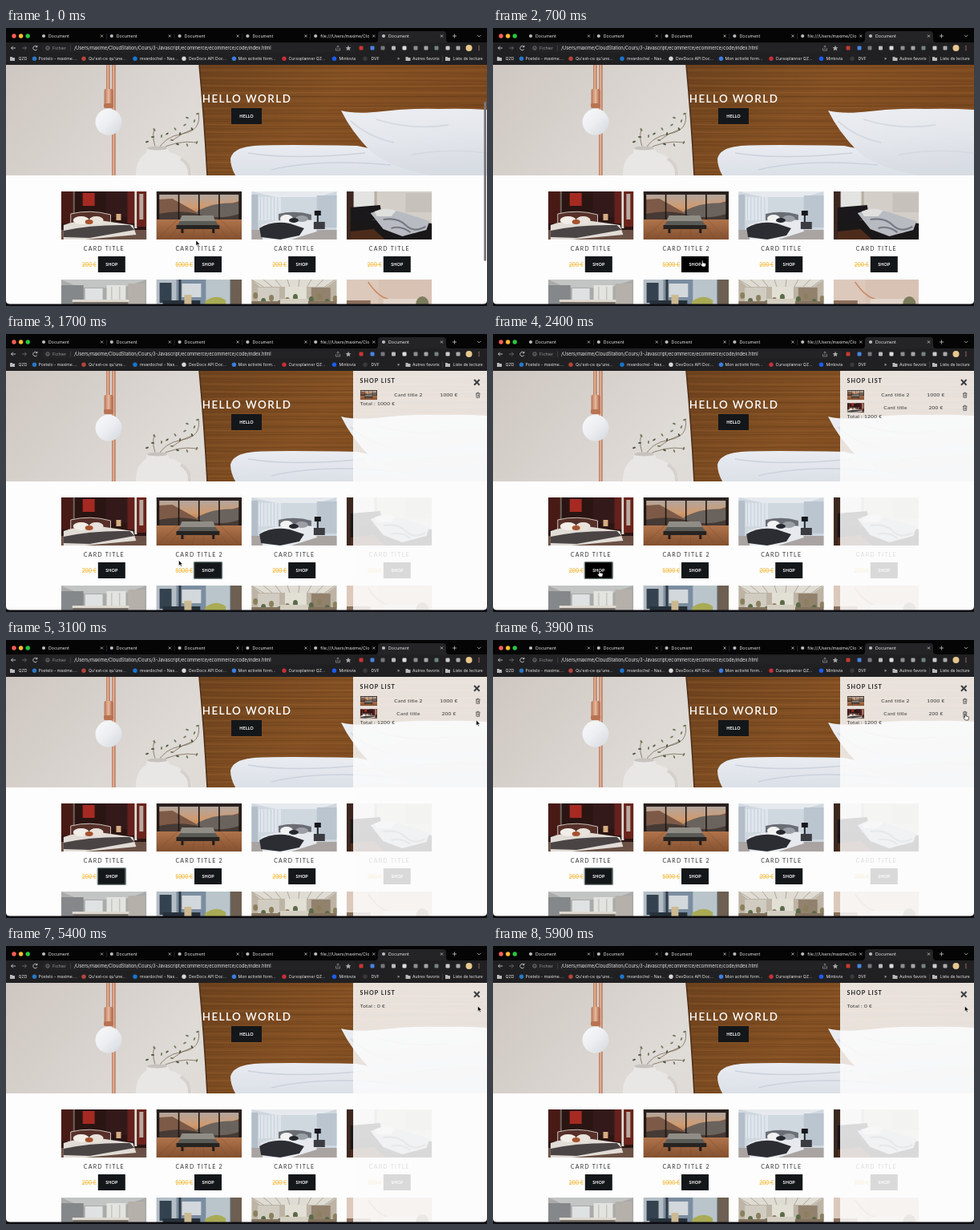
An HTML page for the animation above (6000 ms loop, 600 by 347 pixels).

```html
<!DOCTYPE html>
<html lang="fr">
<head>
<meta charset="utf-8">
<title>Shop</title>
<style>
html, body { margin: 0; width: 100%; height: 100%; overflow: hidden; background: #000; }
svg { display: block; }
#stage { width: 600px; height: 347px; }
text { white-space: pre; }
.ui { font: 5.3px Inter, sans-serif; fill: #e6e6e6; }
.url { font-size: 5.72px; }
.mark { font-size: 5.15px; }
.page { font-family: Lato, sans-serif; }
.mid { text-anchor: middle; }
.hero { font-size: 13.4px; font-weight: 600; letter-spacing: 1.45px; fill: #fff; }
.btn { font-size: 5.4px; font-weight: 700; letter-spacing: .1px; fill: #fff; }
.title { font-size: 7px; letter-spacing: 1.25px; fill: #333; }
.price { font-size: 7px; font-weight: 700; fill: #f3c253; text-decoration: line-through; }
.head { font-size: 7.2px; font-weight: 700; letter-spacing: 1px; fill: #222; }
.item { font-size: 6.5px; letter-spacing: .3px; fill: #333; }
</style>
</head>
<body>
<svg id="stage" viewBox="0 0 600 347"></svg>
<script>
const rect = (x, y, w, h, fill, rx = 0, more = '') =>
  `<rect x="${x}" y="${y}" width="${w}" height="${h}" fill="${fill}" rx="${rx}" ${more}/>`;
const dot = (x, y, r, fill) => `<circle cx="${x}" cy="${y}" r="${r}" fill="${fill}"/>`;
const oval = (x, y, rx, ry, fill) => `<ellipse cx="${x}" cy="${y}" rx="${rx}" ry="${ry}" fill="${fill}"/>`;
const path = (d, fill) => `<path d="${d}" fill="${fill}"/>`;
const line = (d, color, w = 1, more = '') =>
  `<path d="${d}" fill="none" stroke="${color}" stroke-width="${w}" ${more}/>`;
const text = (x, y, cls, s, more = '') => `<text x="${x}" y="${y}" class="${cls}" ${more}>${s}</text>`;
const group = (id, body) => `<g id="${id}">${body}</g>`;
const many = (n, f) => Array.from({ length: n }, (_, i) => f(i)).join('');
const gradient = (id, stops, dir = 'x2="0" y2="1"') =>
  `<linearGradient id="${id}" ${dir}>` +
  stops.map((c, i) => `<stop offset="${i / (stops.length - 1)}" stop-color="${c}"/>`).join('') +
  '</linearGradient>';

let seed = 7;
const rand = () => (seed = seed * 16807 % 2147483647) / 2147483647;

// Room pictures, each 107 by 60
const rooms = [
  rect(0, 0, 107, 60, '#2a1513') + rect(0, 0, 15, 40, '#471a16') + rect(27, 2, 15, 16, '#a62a22') +
    rect(15, 0, 2, 34, '#70635a') + rect(56, 0, 27, 32, '#33191a') + rect(83, 0, 9, 40, '#64201d') +
    rect(92, 0, 3, 46, '#e4ded6') + rect(95, 0, 12, 44, '#6b241c') + rect(98, 3, 5, 32, '#b9aaa0') +
    rect(0, 48, 107, 12, '#6b5145') + path('M12 28Q36 23 62 29V42H12Z', '#57302a') +
    line('M12 40V28Q36 22 62 29V38', '#cfc4ba', 1) +
    path('M3 42Q24 34 55 37L90 42 94 54 30 60H3Z', '#e2dcd6') + oval(25, 36, 10, 5, '#f2ede7') +
    oval(44, 36, 9, 5, '#e8e2da') + oval(35, 38, 5, 3, '#a5522e') +
    path('M3 49Q38 41 86 42L92 48 36 58 3 57Z', '#4a4445') + rect(69, 28, 6, 8, '#d5ac82'),
  rect(0, 0, 107, 60, '#2a1f1b') + rect(3, 4, 101, 31, 'url(#dusk)') +
    path('M3 10L20 9 38 19 52 27 70 22 104 12V35H3Z', '#7d5a47') +
    path('M52 24Q75 12 104 15V36H45Z', '#6a625d') + path('M3 28Q30 22 55 29T104 28V36H3Z', '#463a34') +
    many(5, i => rect(2 + i * 25.3, 0, 1.6, 36, '#1d1715')) + rect(0, 0, 107, 4, '#29211f') +
    rect(0, 35, 107, 25, 'url(#floor)') +
    many(8, i => line(`M${i * 15} 60L${27 + i * 7.6} 35`, '#7d4b2d', .5)) +
    path('M31 35L72 35 79 44 25 44Z', '#5a5a56') + path('M32 30H71L74 37H29Z', '#8f8d86') +
    path('M25 42H79V47H25Z', '#272321') + rect(31, 47, 3, 5, '#211b19') + rect(70, 47, 3, 5, '#211b19'),
  rect(0, 0, 107, 60, '#cfd7df') + path('M0 0H107L82 7H31Z', '#e6eaee') + rect(0, 4, 8, 46, '#b3bec9') +
    rect(9, 7, 28, 29, '#dfe5eb') + many(6, i => rect(11 + i * 4.3, 7, .7, 29, '#bdc8d2')) +
    rect(82, 5, 25, 40, '#bac5d0') + rect(0, 48, 107, 12, '#a9a4a1') +
    path('M34 28Q55 23 75 29V39H34Z', '#6a6d74') + path('M12 42Q38 32 78 36L82 50 50 60H14Z', '#e6e9ed') +
    path('M10 46Q26 36 48 40L66 46 60 55 36 60 12 57Z', '#2c2d33') + oval(44, 34, 8, 5, '#f2f2f2') +
    oval(63, 34, 8, 4, '#9ba0a7') + oval(53, 36, 6, 3, '#25282f') + rect(79, 24, 8, 6, '#16171b') +
    rect(82, 30, 2, 9, '#24252a') + rect(78, 38, 14, 9, '#3a3c42'),
  rect(0, 0, 107, 60, '#d3cfc8') + rect(0, 0, 9, 60, '#3d2820') + rect(9, 0, 26, 22, '#e3e4e2') +
    rect(35, 0, 3, 24, '#b9aea2') + rect(74, 2, 33, 24, '#c6c2bb') +
    path('M5 20L42 17 45 33 5 42Z', '#1a181a') + path('M5 38L60 33 107 40V60H5Z', '#191718') +
    path('M5 50L34 47 48 60H5Z', '#4d2b1b') +
    path('M30 27Q50 20 70 26L104 37 100 48 70 56 46 47Z', '#b8bbc1') +
    path('M35 25Q48 19 62 24L56 31 38 31Z', '#e0e0df') +
    line('M46 35Q64 32 74 42T99 44M56 46Q68 42 80 51', '#747982', 2.2),
  rect(0, 0, 107, 60, '#a9aaa9') + path('M0 0H107L78 10H23Z', '#c3c5c5') + rect(0, 7, 28, 34, '#85888a') +
    rect(30, 11, 22, 17, '#dfe2e2') + rect(57, 7, 24, 21, '#e3e3df') + rect(84, 5, 21, 50, '#b5b0a9') +
    rect(63, 9, .8, 19, '#aaa') + rect(73, 9, .8, 19, '#aaa') + rect(15, 25, 69, 35, '#777069') + rect(14, 25, 71, 3, '#dfd9d0'),
  rect(0, 0, 107, 60, '#7b8da0') + rect(0, 0, 25, 60, '#b4bdc5') + rect(4, 4, 15, 25, '#33424e') +
    rect(28, 0, 3, 60, '#363b42') + rect(32, 5, 24, 17, '#d2d8db') + rect(62, 0, 30, 60, '#b9c5ca') +
    rect(93, 0, 14, 60, '#6d5f51') + path('M61 27Q75 17 87 26V60H59Z', '#a9ab55') +
    path('M8 26H55V60H8Z', '#28323c') + rect(35, 19, 9, 12, '#cdb991'),
  rect(0, 0, 107, 60, '#bdb4a5') + path('M0 0H107L94 9H11Z', '#dfdcd4') +
    many(8, i => line(`M${i * 15} 0L${15 + i * 11} 9`, '#a49a8b', .8)) + rect(8, 10, 27, 20, '#d0ccc1') +
    rect(42, 9, 27, 19, '#e2dfd5') + rect(75, 10, 24, 20, '#92826d') +
    many(11, i => oval(5 + i * 10, 20 + i * 7 % 11, 3, 4, i % 2 ? '#5a6b47' : '#8b805d')) + rect(0, 27, 107, 33, '#83735f') +
    rect(36, 24, 35, 9, '#d5cfc2'),
  rect(0, 0, 107, 60, '#d8c2b4') + rect(0, 0, 40, 60, '#dcc9bc') + line('M27 3Q40 22 52 24', '#c98a63', 1.5) +
    rect(0, 26, 30, 34, '#8a705c') + rect(46, 24, 44, 36, '#e2d5ca') + oval(95, 30, 8, 9, '#7d7c5e')
];
const board = 'M241 46H600V184H251Q247 110 241 46Z';
const defs = '<defs>' +
  gradient('dusk', ['#b3a59d', '#cf9b70', '#b06a40']) +
  gradient('floor', ['#b0744b', '#83502f']) +
  gradient('wall', ['#cec7c1', '#e0dcd8', '#d9d3ce'], 'x2="1" y2=".2"') +
  gradient('wood', ['#6e431f', '#855124', '#7c4920'], 'x2="1" y2=".35"') +
  gradient('copper', ['#b57355', '#e9b99e', '#a45f43'], 'x2="1"') +
  gradient('bulb', ['#f9fafb', '#eceef1', '#d3d7dc'], 'x2="1" y2="1"') +
  gradient('pillow', ['#eceef2', '#e4e7ec', '#d8dce3'], 'x2=".2" y2="1"') +
  gradient('sheet', ['#e9ecf1', '#d9dee6']) +
  rooms.map((r, i) => `<symbol id="room${i}" viewBox="0 0 107 60" preserveAspectRatio="none">${r}</symbol>`).join('') +
  '<clipPath id="hero"><rect y="46" width="600" height="138"/></clipPath>' +
  `<clipPath id="board"><path d="${board}"/></clipPath></defs>`;
const room = (i, x, y, w = 106.5, h = 60) => `<use href="#room${i}" x="${x}" y="${y}" width="${w}" height="${h}"/>`;

function grain(i) {
  const y = 43 + i * 3.2, a = rand() * 8 - 4, b = rand() * 8 - 4;
  return line(`M241 ${y}C330 ${y + a} 420 ${y + b} 600 ${y + a / 2}`, i % 3 ? '#54300f' : '#a96f35', .6 + rand(), 'opacity=".25"');
}

function hero() {
  const sprigs = [[183, 136], [185, 127], [194, 135], [201, 132], [207, 140], [211, 126], [217, 132], [223, 121],
    [226, 112], [232, 126], [235, 116], [239, 107], [214, 145], [226, 146], [238, 143], [176, 142]];
  const leaves = sprigs.map(([x, y], i) =>
    `<ellipse cx="${x}" cy="${y}" rx="2.1" ry="1" fill="${i % 3 ? '#737a5c' : '#4d583f'}" transform="rotate(${i * 47} ${x} ${y})"/>`).join('');
  return '<g clip-path="url(#hero)">' + rect(0, 46, 600, 138, 'url(#wall)') + path(board, 'url(#wood)') +
    '<g clip-path="url(#board)">' + many(45, grain) + '</g>' +
    line('M241 46Q247 110 251 184', '#4f2e17', 1.5) +
    path('M280 163Q283 150 306 147.5T438 147L500 160 600 169V190H290Q280 176 280 163Z', 'url(#sheet)') +
    line('M302 156Q356 165 448 156M331 177Q391 163 480 171', '#ccd2dc', 1.5) +
    path('M418 103Q436 108 470 104T540 101Q570 100 600 102V184H530Q476 174 454 153 430 128 418 103Z', 'url(#pillow)') +
    line('M430 116Q452 136 484 143M462 114Q506 128 552 121M506 158Q555 150 600 156', '#d5d9e0', 1.8) +
    rect(125, 46, 4.5, 31, 'url(#copper)') + rect(132, 46, 4.5, 138, 'url(#copper)') +
    rect(122.5, 76, 11, 24, 'url(#copper)', 2) + rect(122, 94, 12, 6, '#b97353', 2) +
    dot(128, 117.3, 16.5, 'url(#bulb)') +
    line('M189 154Q181 140 185 125M189 154Q196 136 220 132T240 106M189 153Q213 139 239 143M208 140Q219 131 234 126', '#695b42', .7) +
    leaves + path('M176 149Q188 146 201 149L204 155Q232 163 232 186H162Q161 164 175 156Z', '#e9e7e5') +
    oval(188.5, 150, 12.5, 2.5, '#c7c2bd') + line('M218 163Q230 170 229 184', '#d6d1cd', 4) + '</g>';
}

function chrome() {
  const tabs = ['Document', 'Document', 'Document', 'Document', 'file:///Users/maxime/Clo', 'Document'];
  const marks = [
    [8, '', 15.5, 'QZD'], [35.5, '#2878c8', 40.5, 'Postelo - maxime....'], [97, '#b8433b', 103, 'Qu\'est-ce qu\'une...'],
    [161, '#1776d2', 167, 'mvardochel - Nas...'], [222, '#d7d7d7', 228, 'DevDocs API Doc...'],
    [284.5, '#3b7de0', 289.5, 'Mon activité form...'], [347, '#c72f38', 352.5, 'Cursoplanner QZ...'],
    [409.5, '#1d5df2', 415.5, 'Mintovia'], [448, '#3a3a3c', 455.5, 'DVF'], [501.5, '', 507, 'Autres favoris'], [551, '', 557.5, 'Liste de lecture']];
  const tools = [[443, '#c8372f'], [457, '#4a83e0'], [470, '#77787c'], [483.5, '#bbb'], [497, '#ddd'], [511, '#8d8d8d'],
    [524, '#a5a5a8'], [537, '#71847c'], [551, '#ccc'], [564, '#aaa']];
  const folder = x => path(`M${x - 3} 36H${x - .5}l1 1H${x + 3}V41H${x - 3}Z`, '#b9b9b9');
  return rect(0, 0, 600, 46, '#050505') + rect(0, 18, 600, 28, '#202022') +
    path('M460 18Q464 18 464 14V8Q464 4 468 4H545Q549 4 549 8V14Q549 18 553 18Z', '#242426') +
    ['#ff5f57', '#febc2e', '#28c840'].map((c, i) => dot(10 + i * 8.6, 10, 2.7, c)).join('') +
    tabs.map((s, i) => {
      const x = 47 + i * 84.8;
      return dot(x, 10, 2.1, '#b9bdc2') + text(x + 6, 12, 'ui', s) +
        line(`M${x + 71} 8.5l3 3m0-3l-3 3`, '#ddd', .7) + (i < 4 ? rect(x + 78, 7, .5, 7, '#444') : '');
    }).join('') + line('M557 10h5m-2.5-2.5v5', '#ddd', .7) + line('M588 8.8l2.2 2.2 2.2-2.2', '#ddd', .7) +
    rect(44, 19.5, 392, 11, '#232325', 5.5) +
    line('M12 25H6.5m2.3-2.3L6.5 25l2.3 2.3', '#ddd', .8) + line('M20 25h5.5m-2.3-2.3l2.3 2.3-2.3 2.3', '#777', .8) +
    line('M38.5 23.3a2.7 2.7 0 1 0 .3 3.2M38.9 21.8v2h-2', '#ddd', .8) +
    '<circle cx="52" cy="25" r="2.2" fill="none" stroke="#aaa" stroke-width=".6"/>' + rect(51.7, 24.5, .6, 1.8, '#aaa') +
    text(58, 27, 'ui', 'Fichier', 'style="fill:#999"') + rect(80.5, 21.5, .5, 7, '#555') +
    text(85, 27, 'ui url', '/Users/maxime/CloudStation/Cours/3-Javascript/ecommerce/ecommerce/code/index.html') +
    line('M411.5 25v3h5v-3M414 27v-5m-1.5 1.5l1.5-1.5 1.5 1.5', '#aaa', .6) +
    path('M427 21.8l1 2.2 2.4.2-1.8 1.6.6 2.4-2.2-1.3-2.2 1.3.6-2.4-1.8-1.6 2.4-.2Z', '#aaa') +
    tools.map(([x, c]) => rect(x - 2.5, 22.5, 5, 5, c, 1)).join('') +
    dot(577.5, 25, 4, '#e7c78d') + many(3, i => dot(590, 22.8 + i * 2.2, .7, '#d98a80')) +
    marks.map(([x, c, tx, s]) => (c ? dot(x, 38.3, 2.7, c) : folder(x)) + text(tx, 40.2, 'ui mark', s)).join('') +
    text(488, 40.2, 'ui', '»') + rect(544.5, 34.5, .5, 8, '#555');
}

function shop() {
  const xs = [68.8, 187.6, 306.2, 424.8];
  const cards = xs.map((x, i) => {
    const mid = x + 53, odd = i === 1, bx = odd ? 235 : x + 46;
    return room(i, x, 204) + text(mid + .5, 278.2, 'title mid', odd ? 'CARD TITLE 2' : 'CARD TITLE') +
      text(odd ? 211 : x + 26, 297.6, 'price', odd ? '1000 €' : '200 €') +
      rect(bx, 285, 34, 20, '#14171a', 0, `id="buy${i}"`) + text(bx + 17, 297.2, 'btn mid', 'SHOP') + room(i + 4, x, 314);
  }).join('');
  const ring = (id, x) => rect(x, 284.6, 35, 20.8, 'none', 1, `id="${id}" stroke="#71807a" stroke-width="1.4"`);
  return `<g class="page">${hero()}` + text(300.5, 93.2, 'hero mid', 'HELLO WORLD') +
    rect(281, 100, 38, 20, '#14171a') + text(300, 112.2, 'btn mid', 'HELLO') + cards +
    ring('ring0', 114.3) + ring('ring1', 234.5) + '</g>' + rect(596.2, 92, 2.8, 199, '#77777a', 1.4, 'id="bar"');
}

function panel() {
  const bin = y => line(`M586 ${y - 2}h5.4M587.8 ${y - 2}v-1h1.8v1M586.6 ${y - 2}l.3 5.2h3.6l.3-5.2M588 ${y - .6}v2.6m1.4-2.6v2.6`, '#444', .7);
  const row = (id, y, pic, name, cost) => group(id, room(pic, 441.8, y - 6, 21.2, 12) +
    text(502, y + 2.2, 'item mid', name) + text(552.5, y + 2.2, 'item mid', cost) + bin(y));
  return `<g id="panel" class="page">` + rect(433, 46, 167, 299, '#fcfcfc', 0, 'fill-opacity=".85"') +
    text(441.5, 61, 'head', 'SHOP LIST') + line('M584 57l6.6 6.8m0-6.8l-6.6 6.8', '#3d3f42', 2) +
    row('row0', 76.2, 1, 'Card title 2', '1000 €') + row('row1', 92.2, 0, 'Card title', '200 €') +
    text(441.8, 88.7, 'item', '', 'id="total"') + '</g>';
}

const floor = path('M0 340Q0 344.6 5 344.6H595Q600 344.6 600 340V347H0Z', '#0d0d12');
const cursors =
  group('arrow', '<path d="M0 0V6.8L1.6 5.3 2.7 7.8 3.8 7.3 2.7 4.9H4.9Z" fill="#000" stroke="#fff" stroke-width=".5"/>') +
  group('hand', '<path d="M0 .4Q.8-.5 1.4.4V3L4.6 3.7Q5.3 4 5.1 5L4.4 8H.6L-1.7 5Q-1.7 4-.8 4.2L0 4.9Z" fill="#fff" stroke="#000" stroke-width=".6"/>');

const stage = document.getElementById('stage');
stage.innerHTML = defs + rect(0, 46, 600, 301, '#fdfdfd') + shop() + panel() + chrome() + floor + cursors;

// time, x, y of the pointer
const moves = [
  [0, 237, 265], [200, 237, 265], [600, 260.5, 290], [1200, 260.5, 290], [1700, 215.5, 282.5],
  [2000, 132, 295], [2400, 132, 295], [2900, 578, 108], [3100, 586.5, 100], [3500, 588.5, 92],
  [4300, 588.5, 92], [4700, 588, 73], [4800, 588, 73], [5000, 588.5, 75], [6000, 588.5, 75]];
const hands = [[500, 1300], [2000, 2500], [3400, 4200], [4900, 5400]];
// time, rows in the list, total
const lists = [[0, 1, 1000], [2200, 2, 1200], [4200, 1, 1000], [5400, 0, 0]];
const LOOP = 6000, STEP = 100, OPEN = 900, SLIDE = 400;

const get = id => document.getElementById(id);
const show = (id, on) => get(id).setAttribute('visibility', on ? 'inherit' : 'hidden');
const clamp = k => Math.min(1, Math.max(0, k));
const ease = k => k * k * (3 - 2 * k);
const within = (t, a, b) => t >= a && t < b;

function pointer(t) {
  const i = moves.findIndex((m, n) => n && t < m[0]);
  const [t0, x0, y0] = moves[i - 1], [t1, x1, y1] = moves[i];
  const k = ease((t - t0) / (t1 - t0));
  return [x0 + (x1 - x0) * k, y0 + (y1 - y0) * k];
}

function draw(now) {
  const t = Math.floor(now % LOOP / STEP) * STEP;
  const over = hands.some(([a, b]) => within(t, a, b));
  const at = `translate(${pointer(t).join(' ')})`;
  for (const id of ['arrow', 'hand']) get(id).setAttribute('transform', at);
  show('arrow', !over);
  show('hand', over);
  get('bar').setAttribute('opacity', clamp((500 - t) / 300));

  const slide = ease(clamp((t - OPEN) / SLIDE));
  get('panel').setAttribute('transform', `translate(${167 * (1 - slide)} 0)`);
  show('panel', t >= OPEN);
  const [, rows, sum] = lists.filter(l => t >= l[0]).pop();
  show('row0', rows > 0);
  show('row1', rows > 1);
  const total = get('total');
  total.textContent = `Total : ${sum} €`;
  total.setAttribute('y', [77.2, 88.7, 104.6][rows]);

  show('ring1', within(t, OPEN, 2200));
  show('ring0', within(t, 2200, 4200));
  get('buy1').setAttribute('fill', within(t, 500, 1300) ? '#000' : '#14171a');
  get('buy0').setAttribute('fill', within(t, 2000, 2500) ? '#000' : '#14171a');
}

const start = performance.now();
function tick() {
  draw(performance.now() - start);
  requestAnimationFrame(tick);
}
tick();
</script>
</body>
</html>
```
